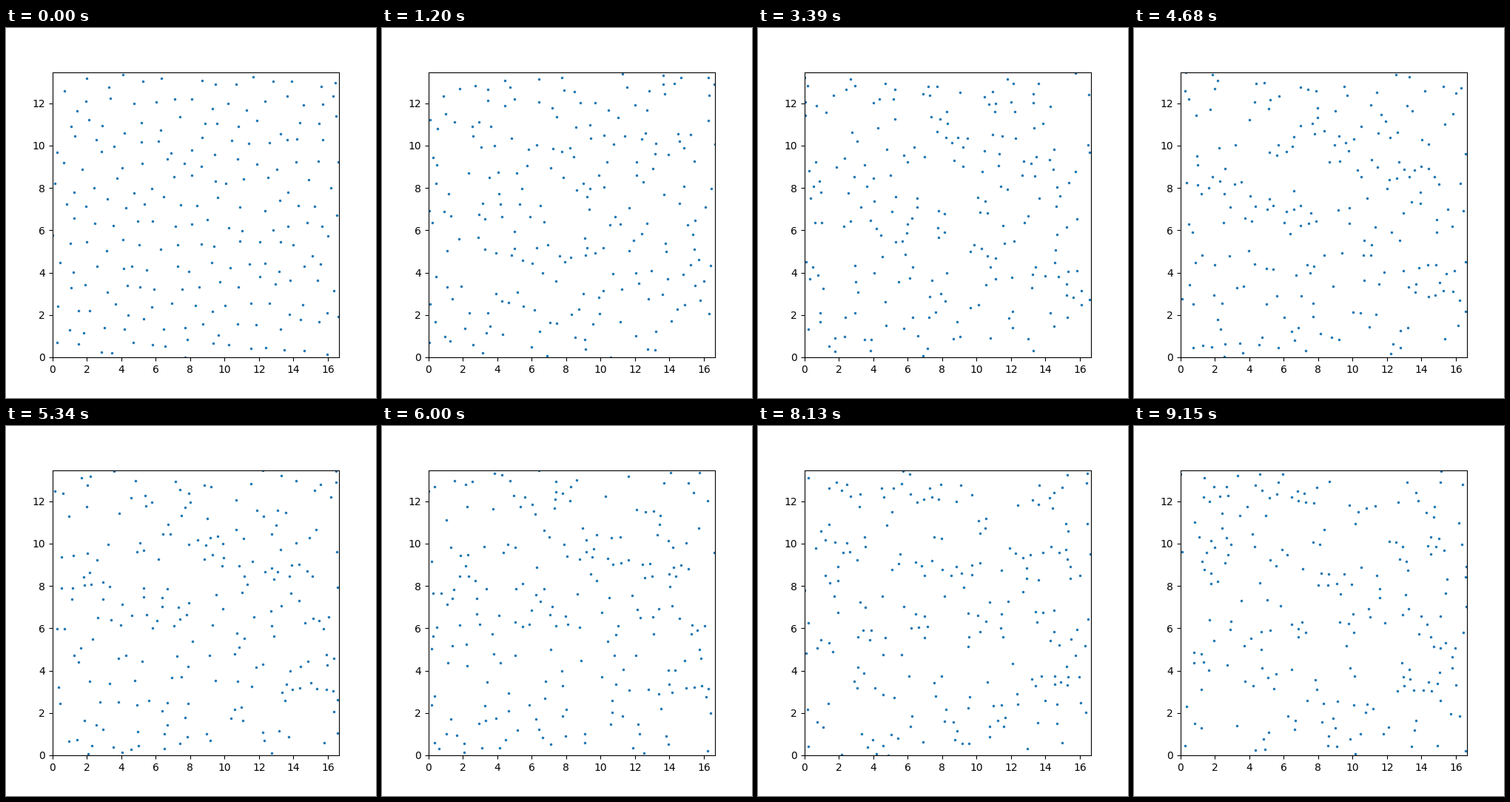
A matplotlib script for the animation above (9180 ms loop, 500 by 500 pixels).

```python
import numpy as np
import matplotlib.pyplot as plt
from matplotlib.animation import FuncAnimation

FRAMES, INTERVAL = 306, 30          # ms per frame
NX, NY, A = 15, 14, 1.11            # triangular lattice
BOX = np.array([NX * A, NY * A * np.sqrt(3) / 2])
N = NX * NY

SIGMA, EPS, SPEED, JITTER = 0.37, 0.4, 0.4, 0.21
CUTOFF, REACH = 2.5 * SIGMA, 1.25
STEPS = 10
DT = INTERVAL / 1000 / STEPS

rng = np.random.default_rng(12)


def nearest(d):
    """Shortest periodic separation."""
    return d - BOX * np.round(d / BOX)


def start_positions():
    """Jittered lattice in which no two particles overlap."""
    row, col = np.divmod(np.arange(N), NX)
    x = (col + 0.25 + 0.5 * (row % 2)) * A
    y = (row + 0.5) * A * np.sqrt(3) / 2
    pos = np.empty((0, 2))
    for site in np.column_stack([x, y]):
        for _ in range(200):
            p = (site + rng.normal(0, JITTER, 2)) % BOX
            if np.all(np.hypot(*nearest(pos - p).T) > 0.9 * SIGMA):
                break
        pos = np.vstack([pos, p])
    return pos


def close_pairs(pos):
    d = nearest(pos[:, None] - pos[None])
    return np.nonzero(np.triu((d ** 2).sum(-1) < REACH ** 2, 1))


def forces(pos, i, j):
    """Truncated Lennard-Jones forces."""
    d = nearest(pos[i] - pos[j])
    r2 = np.maximum((d ** 2).sum(1), (0.75 * SIGMA) ** 2)
    s6 = (SIGMA ** 2 / r2) ** 3
    mag = np.where(r2 < CUTOFF ** 2, 24 * EPS * (2 * s6 ** 2 - s6) / r2, 0)
    f = d * mag[:, None]
    return np.column_stack([
        np.bincount(i, f[:, k], N) - np.bincount(j, f[:, k], N)
        for k in range(2)
    ])


def simulate():
    pos = start_positions()
    vel = rng.normal(0, SPEED, (N, 2))
    vel -= vel.mean(0)
    path = [pos]
    for _ in range(FRAMES - 1):
        i, j = close_pairs(pos)
        acc = forces(pos, i, j)
        for _ in range(STEPS):
            vel = vel + acc * DT / 2
            pos = (pos + vel * DT) % BOX
            acc = forces(pos, i, j)
            vel = vel + acc * DT / 2
        path.append(pos)
    return path


path = simulate()

fig, ax = plt.subplots(figsize=(5, 5), dpi=100)
ax.set_xlim(0, BOX[0])
ax.set_ylim(0, BOX[1])
dots, = ax.plot([], [], "o", ms=1.5)


def update(n):
    dots.set_data(*path[n].T)
    return dots,


anim = FuncAnimation(fig, update, frames=FRAMES, interval=INTERVAL,
                     repeat=True, repeat_delay=0)
plt.show()
```
